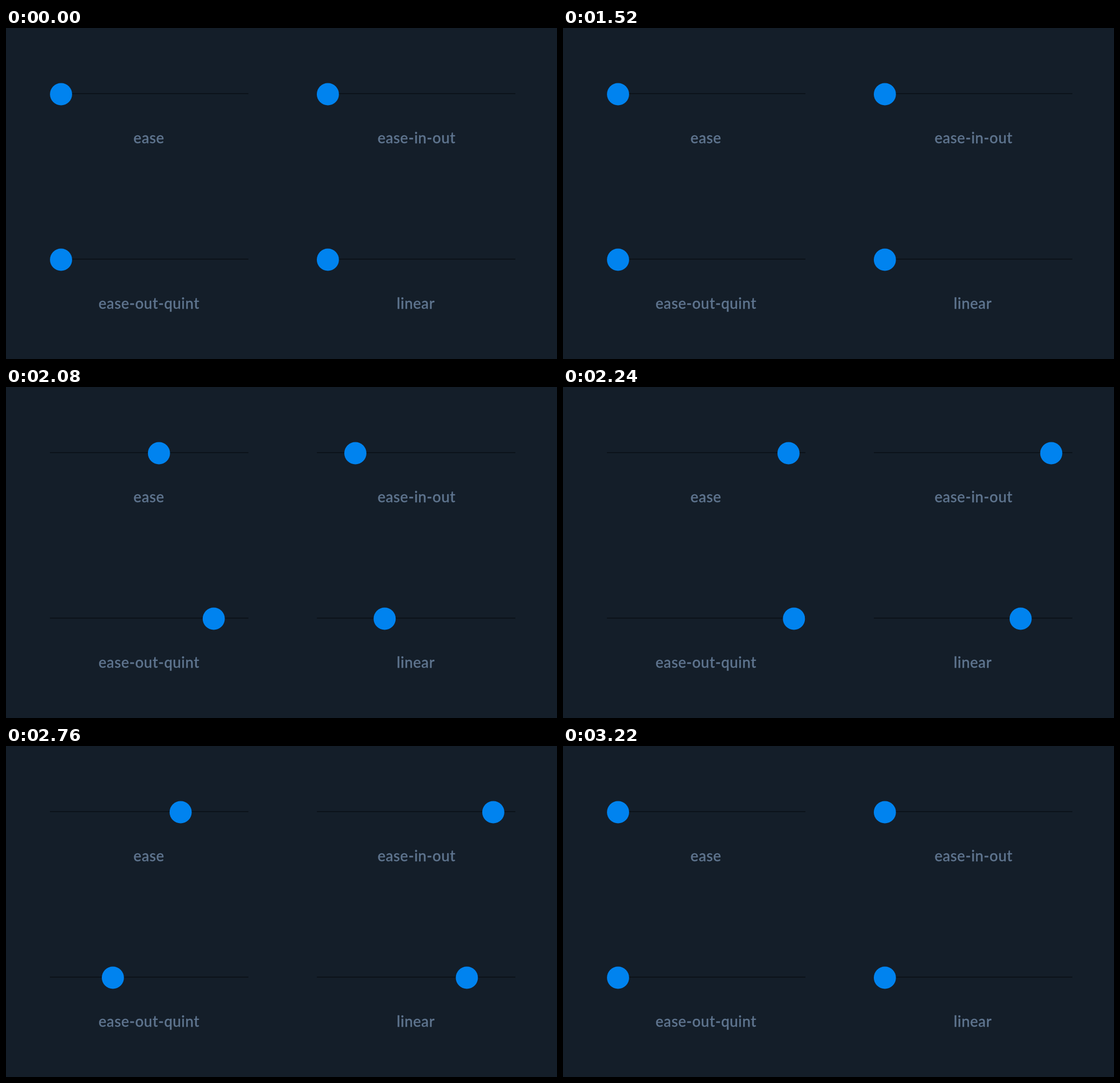
These frames come from a looping animation (966 by 580 pixels, 3.24 s). An HTML page with a canvas:

```html
<!DOCTYPE html>
<html lang="en">
<head>
<meta charset="utf-8">
<title>Easing comparison</title>
<style>
  html, body { margin: 0; width: 100%; height: 100%; overflow: hidden; background: #141e29; }
  canvas { display: block; }
</style>
</head>
<body>
<canvas id="stage" width="966" height="580"></canvas>
<script>
const ctx = document.getElementById('stage').getContext('2d');
const LOOP = 3240;
const OUT = { start: 1966, length: 357 };
const BACK = { start: 2685.3, length: 358 };
const TRAVEL = 309, RADIUS = 19.4, TRACK = 348;

// CSS-style cubic-bezier timing function, solved by bisection
function bezier(x1, y1, x2, y2) {
  const curve = (a, b, t) =>
    3 * a * t * (1 - t) ** 2 + 3 * b * t * t * (1 - t) + t ** 3;
  return x => {
    if (x <= 0) return 0;
    if (x >= 1) return 1;
    let lo = 0, hi = 1;
    for (let i = 0; i < 30; i++) {
      const mid = (lo + hi) / 2;
      if (curve(x1, x2, mid) < x) lo = mid; else hi = mid;
    }
    return curve(y1, y2, lo);
  };
}

const sliders = [
  { x: 77, y: 116, label: 'ease', mid: 250.6, ease: bezier(0.25, 0.1, 0.25, 1) },
  { x: 544.8, y: 116, label: 'ease-in-out', mid: 719.8, ease: bezier(0.645, 0.045, 0.355, 1) },
  { x: 77, y: 406, label: 'ease-out-quint', mid: 250.7, ease: bezier(0.23, 1, 0.32, 1) },
  { x: 544.8, y: 406, label: 'linear', mid: 718.4, ease: x => x }
];

const progress = (t, move) => Math.min(1, Math.max(0, (t - move.start) / move.length));

function drawSlider(s, t) {
  const pos = s.ease(progress(t, OUT)) - s.ease(progress(t, BACK));

  ctx.fillStyle = '#0c131a';
  ctx.fillRect(Math.round(s.x), s.y - 2, TRACK, 2);

  ctx.fillStyle = '#0083ef';
  ctx.beginPath();
  ctx.arc(s.x + 19.5 + pos * TRAVEL, s.y, RADIUS, 0, Math.PI * 2);
  ctx.fill();

  ctx.fillStyle = ctx.strokeStyle = '#5f758f';
  ctx.fillText(s.label, s.mid, s.y + 85.5);
  ctx.strokeText(s.label, s.mid, s.y + 85.5);
}

function draw(now) {
  const t = now % LOOP;
  ctx.fillStyle = '#141e29';
  ctx.fillRect(0, 0, 966, 580);
  ctx.font = '500 26px Lato, "Open Sans", sans-serif';
  ctx.letterSpacing = '0.55px';
  ctx.textAlign = 'center';
  ctx.lineWidth = 0.3;
  ctx.lineJoin = 'round';
  for (const s of sliders) drawSlider(s, t);
  requestAnimationFrame(draw);
}
requestAnimationFrame(draw);
</script>
</body>
</html>
```
